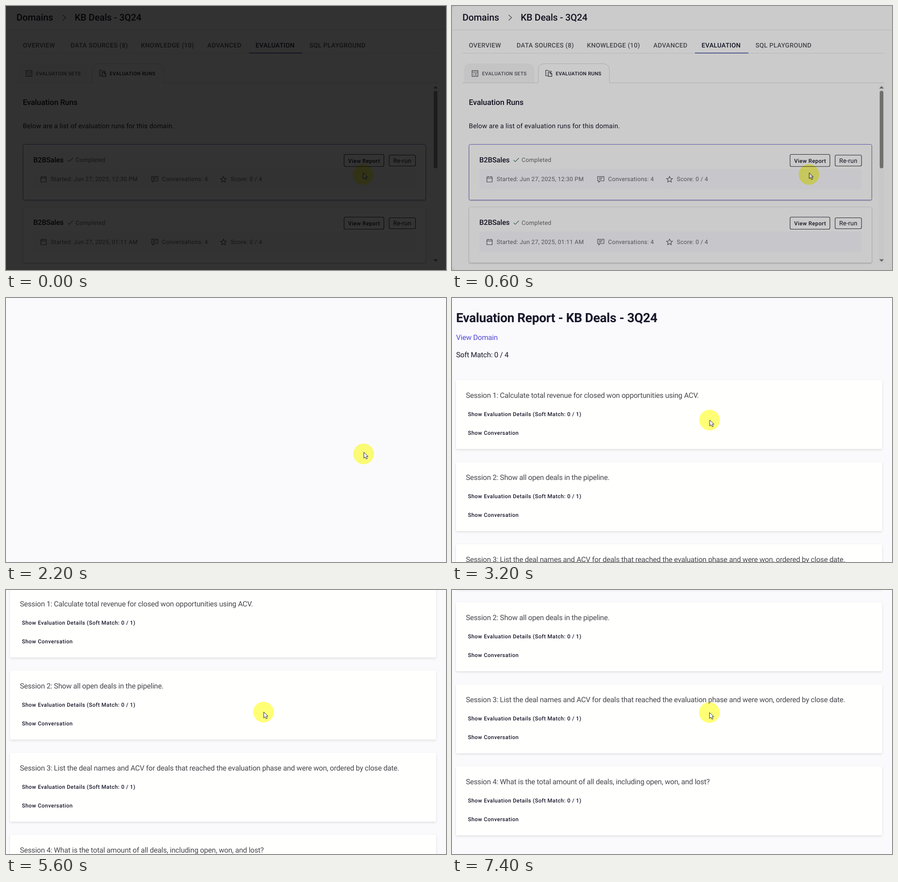
Recreate the animation shown at these times as an HTML page. Size 967 by 579 pixels, loop 8 s.

```html
<!DOCTYPE html>
<html lang="en">
<head>
<meta charset="utf-8">
<title>Evaluation report</title>
<style>
  html, body { margin: 0; width: 100%; height: 100%; overflow: hidden; background: #f9f9fc; }
  svg { display: block; width: 100%; height: 100%; }
  text { font-family: Roboto, sans-serif; fill: #17172a; text-rendering: geometricPrecision; white-space: pre; }
  .crumb { font-size: 20.5px; font-weight: 500; letter-spacing: -.12px; }
  .tab { font-size: 14px; font-weight: 500; letter-spacing: .33px; }
  .subtab { font-size: 10.8px; font-weight: 500; letter-spacing: .4px; }
  .heading { font-size: 17px; font-weight: 500; letter-spacing: -.1px; }
  .body { font-size: 14.5px; letter-spacing: .2px; }
  .name { font-size: 15.8px; font-weight: 500; letter-spacing: -.15px; }
  .meta { font-size: 13px; letter-spacing: .25px; }
  .action { font-size: 12px; font-weight: 500; letter-spacing: .46px; }
  .rerun { font-size: 13.5px; letter-spacing: .2px; }
  .title { font-size: 28px; font-weight: 700; letter-spacing: -.3px; }
  .line { font-size: 16px; letter-spacing: -.21px; }
  .muted { fill: #55555c; }
  .soft { fill: #66666c; }
  .session { fill: #46464b; }
  .link { fill: #5148d6; }
  .icon { fill: none; stroke: #55555c; stroke-width: 1.2; }
  .card { fill: #fffffe; filter: drop-shadow(0 2px 2.5px #0000001c); }
  .button { fill: none; stroke: #2a2a3a; stroke-width: 1.1; }
  .rule { stroke: #e4e4e9; fill: none; }
  #halo { fill: #ffff76; mix-blend-mode: multiply; }
</style>
</head>
<body>
<svg id="stage" viewBox="0 0 967 579" preserveAspectRatio="none"></svg>
<script>
const LOOP = 8000, STEP = 200;
const domain = 'KB Deals - 3Q24';

const text = (x, y, label, cls) => `<text x="${x}" y="${y}" class="${cls}">${label}</text>`;
const rect = (x, y, w, h, rx, attrs) =>
  `<rect x="${x}" y="${y}" width="${w}" height="${h}" rx="${rx}" ${attrs}/>`;
const path = (d, attrs) => `<path d="${d}" ${attrs}/>`;
const icon = (x, y, d, attrs = '') =>
  `<path class="icon" transform="translate(${x} ${y})" d="${d}" ${attrs}/>`;

const icons = {
  calendar: 'M.6 2H12.4V13H.6ZM.6 5H12.4M3.5 0V3M9.5 0V3',
  chat: 'M.6 .6H14.4V10H6L3 13V10H.6ZM3.5 3.8H11.5M3.5 6.8H9',
  star: 'M7 .8L8.9 5 13.5 5.5 10.1 8.5 11 13 7 10.7 3 13 3.9 8.5 .5 5.5 5.1 5Z',
  sets: 'M.6 .6H13.4V13.4H.6ZM.6 4H13.4M3 7H5M3 10H5M7 7L8.5 8 11 6.5M7 10.5H11',
  folder: 'M5 13H.6V1H5L6.5 3H12.4V5M6 5.5H11L14 8.5V14.4H6ZM10.5 5.5V9H14',
  check: 'M.5 5L4 8.5 12 .5'
};

function runCard(dy, started, selected) {
  const stroke = selected ? '#736dd8' : '#e9e9ec';
  return `<g transform="translate(0 ${dy})">` +
    rect(37.5, 303.5, 885, 122, 3, `fill="#fefefe" stroke="${stroke}" style="filter:drop-shadow(0 1px 1px #0004)"`) +
    rect(60, 357, 840, 45.5, 3, 'fill="#f9f9fd"') +
    text(60, 342.5, 'B2BSales', 'name') +
    icon(135, 333, icons.check, 'style="stroke:#3d7a52"') +
    text(153, 342, 'Completed', 'meta soft') +
    rect(743, 325.5, 87.5, 26.5, 3, 'class="button"') +
    text(752, 343.5, 'View Report', 'action') +
    rect(842, 327, 58, 24, 3, 'class="button"') +
    text(851, 343.5, 'Re-run', 'rerun') +
    icon(76, 373, icons.calendar) +
    text(98, 384, 'Started: ' + started, 'meta soft') +
    icon(319.5, 373.5, icons.chat) +
    text(343, 384, 'Conversations: 4', 'meta soft') +
    icon(471, 373, icons.star) +
    text(494, 384, 'Score: 0 / 4', 'meta soft') + '</g>';
}

function runsPage() {
  const tabs = [[37, 'OVERVIEW'], [142, 'DATA SOURCES (8)'], [296.5, 'KNOWLEDGE (10)'],
    [442.5, 'ADVANCED'], [548.5, 'EVALUATION'], [667, 'SQL PLAYGROUND']];
  return rect(0, 0, 967, 579, 0, 'fill="#f1f1f4"') +
    rect(0, 0, 990, 579, 11, 'fill="#fdfdfd"') +
    text(23, 32.2, 'Domains', 'crumb') +
    icon(124, 19, 'M.5 .5L7 6.5 .5 12.5') +
    text(151, 32.2, domain, 'crumb') +
    path('M0 52.5H967M23 103.5H950', 'class="rule"') +
    tabs.map(([x, label]) => text(x, 91, label, label === 'EVALUATION' ? 'tab' : 'tab muted')).join('') +
    rect(534, 102.3, 117.5, 1.8, 0, 'fill="#5560ac"') +
    path('M26 168V141Q26 126 41 126H166Q181 126 181 141V168Z', 'fill="#f5f5f6"') +
    path('M23 168.5H189.5V141Q189.5 126.5 204 126.5H331Q346 126.5 346 141V168.5H950',
      'fill="none" stroke="#d6d6da"') +
    icon(43.5, 141, icons.sets) +
    text(66, 151.5, 'EVALUATION SETS', 'subtab muted') +
    icon(205.5, 140, icons.folder, 'style="stroke:#2a2a3a"') +
    text(228, 151.5, 'EVALUATION RUNS', 'subtab') +
    text(37, 217.3, 'Evaluation Runs', 'heading') +
    text(37, 267.5, 'Below are a list of evaluation runs for this domain.', 'body') +
    runCard(0, 'Jun 27, 2025, 12:30 PM', true) +
    runCard(137.5, 'Jun 27, 2025, 01:11 AM', false) +
    rect(938, 171, 12, 393, 0, 'fill="#fafafb"') +
    rect(940, 186, 8, 170, 4, 'fill="#8b8b8b"') +
    path('M939 181L944 175.5 949 181ZM939 555.5L944 561 949 555.5Z', 'fill="#7d7d7d"');
}

function reportPage() {
  const questions = [
    'Calculate total revenue for closed won opportunities using ACV.',
    'Show all open deals in the pipeline.',
    'List the deal names and ACV for deals that reached the evaluation phase and were won, ordered by close date.',
    'What is the total amount of all deals, including open, won, and lost?'
  ];
  return text(9, 52.5, 'Evaluation Report - ' + domain, 'title') +
    text(9, 92.3, 'View Domain', 'line link') +
    text(9, 130.2, 'Soft Match: 0 / 4', 'line') +
    questions.map((question, i) => `<g transform="translate(0 ${i * 180})">` +
      rect(9, 180, 936, 151, 2, 'class="card"') +
      text(30.5, 219, `Session ${i + 1}: ${question}`, 'line session') +
      text(35, 258.6, 'Show Evaluation Details (Soft Match: 0 / 1)', 'action') +
      text(35, 300, 'Show Conversation', 'action') + '</g>').join('');
}

document.getElementById('stage').innerHTML =
  rect(0, 0, 967, 579, 0, 'fill="#fafafd"') +
  `<g id="report">${reportPage()}</g><g id="runs">${runsPage()}</g>` +
  '<circle id="halo" r="22.7"/>' +
  path('M.5 0V13L3.5 10.2 5.7 14.8 8.1 13.7 6 9.2H9.8Z',
    'id="arrow" fill="#fff" stroke="#222" stroke-width="1"') +
  rect(0, 0, 967, 579, 0, 'id="shade"');

const [report, runs, halo, arrow, shade] =
  ['report', 'runs', 'halo', 'arrow', 'shade'].map(id => document.getElementById(id));

// Smooth interpolation through [time, value] keys.
function track(t, keys) {
  const next = keys.findIndex(key => key[0] > t);
  if (next === 0) return keys[0][1];
  if (next < 0) return keys[keys.length - 1][1];
  const [t0, a] = keys[next - 1], [t1, b] = keys[next];
  const p = (t - t0) / (t1 - t0);
  return a + (b - a) * p * p * (3 - 2 * p);
}

const scrollKeys = [[3900, 0], [4150, 91], [4750, 91], [5000, 183],
  [5700, 183], [5950, 275], [6150, 275], [6500, 333]];
const cursorX = [[1200, 784.5], [1600, 786], [2500, 786], [3100, 566], [6400, 566], [6600, 565.5]];
const cursorY = [[1200, 369.5], [1600, 342], [2500, 342], [3100, 267.7], [6400, 267.7], [6600, 268.7]];
const arrowLift = [[2500, 3.7], [3100, 0]];

function draw(t) {
  const x = track(t, cursorX), y = track(t, cursorY);
  halo.setAttribute('transform', `translate(${x} ${y})`);
  arrow.setAttribute('transform', `translate(${x} ${y - track(t, arrowLift)})`);
  report.setAttribute('transform', `translate(0 ${-track(t, scrollKeys)})`);
  runs.style.display = t < 2000 ? '' : 'none';
  report.style.display = t < 2400 ? 'none' : '';
  shade.setAttribute('opacity', Math.max(0, 0.8 - t / 1000));
}

const start = performance.now();
function tick() {
  const t = (performance.now() - start) % LOOP;
  draw(Math.floor(t / STEP) * STEP);
  requestAnimationFrame(tick);
}
tick();
</script>
</body>
</html>
```
